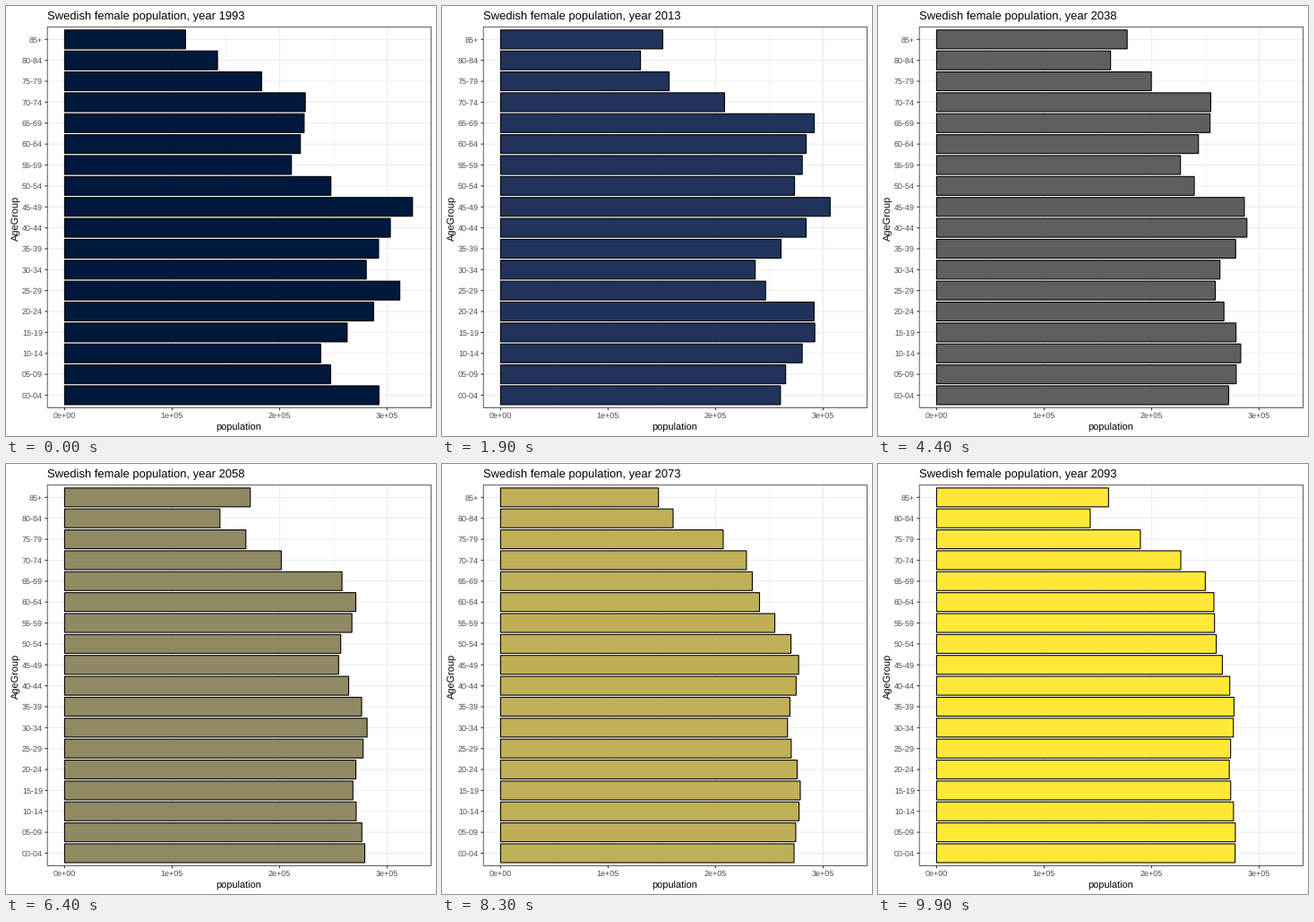
Write a matplotlib script that moves like this. It is 480 px wide and 480 px high and loops after 10000 ms.

```python
import numpy as np
import matplotlib.pyplot as plt
from matplotlib.animation import FuncAnimation
from matplotlib.colors import LinearSegmentedColormap
from matplotlib.patches import Rectangle

plt.rcParams["font.family"] = "Liberation Sans"
plt.rcParams["text.hinting"] = "none"

SIZE, DPI = 480, 72
FRAMES, INTERVAL = 100, 100
LEFT, RIGHT, TOP, BOTTOM = 46.2, 474.5, 23.3, 448.5
X0, PER_100K = 65.4, 120
ROW = (BOTTOM - TOP) / 18.2
AGES = [f"{a:02d}-{a + 4:02d}" for a in range(0, 85, 5)] + ["85+"]
OLD = len(AGES) - 1
LAST = 20  # five-year steps after 1993

# Key sizes of the cohorts born before 1994, as bar lengths in pixels.
BIRTH_STEPS = [-15, -14, -13, -11, -10, -9, -8, -6, -5, -2, -1, 0]
BIRTH_SIZES = [312, 331, 304, 267, 308, 398, 370, 340, 377, 287, 298, 352]

PALETTE = LinearSegmentedColormap.from_list("fill", [
    (0.00, "#00183b"), (0.10, "#00225c"), (0.30, "#3f445a"), (0.45, "#5f5f61"),
    (0.65, "#918964"), (0.80, "#bfaf57"), (1.00, "#ffe837")])


def cohort_size(born):
    """Past births from key points, later ones as a damped echo of them."""
    if born <= 0:
        return np.interp(born, BIRTH_STEPS, BIRTH_SIZES)
    wave = np.cos(2 * np.pi * (born - 0.9) / 6.15)
    return 328.7 + 0.2 * born + 24 * np.exp(-0.13 * (born - 0.9)) * wave


def survival(age):
    """Share of a cohort still alive, with mortality rising towards 80-84."""
    d = OLD - 1 - age
    return np.exp(-0.603 * np.exp(-0.56 * d + 0.0145 * d * d))


def build_steps():
    steps, oldest = [], 135
    for k in range(LAST + 1):
        row = [cohort_size(k - a) * survival(a) for a in range(OLD)]
        steps.append(row + [oldest])
        oldest = 0.42 * oldest + 0.62 * row[-1]
    return steps


def step_at(frame):
    """States last five frames, the last four of them four frames."""
    if frame < 84:
        return (frame + 1) // 5
    return 17 + (frame - 84) // 4


STEPS = build_steps()

fig = plt.figure(figsize=(SIZE / DPI, SIZE / DPI), dpi=DPI, facecolor="white")
ax = fig.add_axes([0, 0, 1, 1])
ax.set_xlim(0, SIZE)
ax.set_ylim(SIZE, 0)
ax.axis("off")


def line(x, y, color, width=1.07):
    ax.plot(x, y, color=color, lw=width, zorder=1, solid_capstyle="butt",
            snap=False)


def label(x, y, text, size, color="black", ha="center"):
    return ax.text(x, y, text, fontsize=size, color=color, ha=ha, va="baseline")


GRID, TICK, TICK_TEXT = "#EBEBEB", "#333333", "#4D4D4D"

for n in range(3):
    x = X0 + PER_100K * (n + 0.5)
    line([x, x], [TOP, BOTTOM], GRID, 0.53)
for n in range(4):
    x = X0 + PER_100K * n
    line([x, x], [TOP, BOTTOM], GRID)
    line([x, x], [BOTTOM, BOTTOM + 2.8], TICK)
    label(x, 460.2, f"{n}e+0{5 if n else 0}", 9, TICK_TEXT)

bars = []
for i, age in enumerate(AGES):
    y = BOTTOM - ROW * (0.6 + i)
    line([LEFT, RIGHT], [y, y], GRID)
    line([LEFT - 2.8, LEFT], [y, y], TICK)
    label(41, y + 3.2, age, 9, TICK_TEXT, ha="right")
    bar = Rectangle((X0, y - 0.45 * ROW), 1, 0.9 * ROW, ec="black", lw=1.07,
                    joinstyle="miter", zorder=3, snap=False)
    bars.append(ax.add_patch(bar))

ax.add_patch(Rectangle((LEFT, TOP), RIGHT - LEFT, BOTTOM - TOP, fill=False,
                       ec=TICK, lw=0.8, zorder=4, snap=False))
label(260.2, 473.3, "population", 11)
ax.text(16.4, 236.5, "AgeGroup", fontsize=11, rotation=90, ha="right", va="center")
title = label(45.8, 15.2, "", 13, ha="left")


def draw(frame):
    k = step_at(frame)
    color = PALETTE(k / LAST)
    for bar, length in zip(bars, STEPS[k]):
        bar.set_width(length)
        bar.set_facecolor(color)
    title.set_text(f"Swedish female population, year {1993 + 5 * k}")
    return [*bars, title]


anim = FuncAnimation(fig, draw, frames=FRAMES, interval=INTERVAL,
                     repeat=True, repeat_delay=0, blit=False)
plt.show()
```
